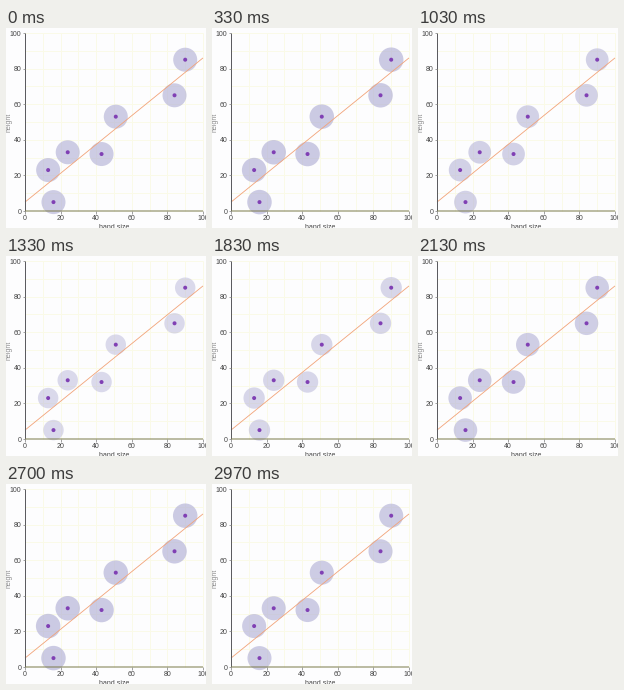
Recreate the animation shown at these times as a matplotlib script. Size 200 px wide and 200 px high, loop 3.01 s.

```python
import numpy as np
import matplotlib.pyplot as plt
from matplotlib.animation import FuncAnimation
from matplotlib.patches import Circle

SIZE, DPI = 200, 72
FRAMES, INTERVAL = 86, 35
LEFT, BASE, SCALE = 19, 183, 1.78
INK, SOFT = "#444444", "#8c8c8c"
GRID = "#fafae8"
POINTS = [(90, 85), (84, 65), (51, 53), (43, 32), (24, 33), (13, 23), (16, 5)]

plt.rcParams["font.family"] = "Liberation Sans"
plt.rcParams["font.size"] = 7


def px(x):
    return LEFT + SCALE * x


def py(y):
    return BASE - SCALE * y


fig = plt.figure(figsize=(SIZE / DPI, SIZE / DPI), dpi=DPI,
                 facecolor="#fdfdfe")
ax = fig.add_axes([0, 0, 1, 1])
ax.set_xlim(0, SIZE)
ax.set_ylim(SIZE, 0)
ax.axis("off")


def line(x0, y0, x1, y1, color, width, z, snap=None):
    ax.plot([x0, x1], [y0, y1], color=color, lw=width, zorder=z,
            solid_capstyle="butt", snap=snap)


def label(x, y, text, color=INK, **kw):
    ax.text(x, y, text, color=color, zorder=6, **kw)


# Faint grid
for v in range(10, 101, 10):
    line(px(v), py(0), px(v), py(100), GRID, 1, 0)
    line(px(0), py(v), px(100), py(v), GRID, 1, 0)

# Axes, ticks and labels
line(LEFT, py(100), LEFT, BASE, "#5c5c60", 1, 5)
line(LEFT, BASE, px(100), BASE, "#7c7c4c", 1, 5, snap=False)
for v in range(0, 101, 20):
    line(LEFT - 2.5, py(v), LEFT, py(v), SOFT, 0.8, 5)
    line(px(v), BASE, px(v), BASE + 2.5, SOFT, 0.8, 5)
    label(15.5, py(v), str(v), ha="right", va="center_baseline")
    label(px(v), 192, str(v), ha="center", va="baseline")
label(px(50), 201, "hand size", ha="center", va="baseline")
label(7, py(50), "height", SOFT, ha="right", va="center", rotation=90)

# Regression line
line(px(0), py(5), px(100), py(86), "#f2a47a", 0.85, 3)

halos = []
for x, y in POINTS:
    halo = Circle((px(x), py(y)), 12, fc="#b4b2d6", ec="none", zorder=2)
    halos.append(ax.add_patch(halo))
    ax.add_patch(Circle((px(x), py(y)), 2, fc="#8040b4", ec="none", zorder=4))


def update(i):
    swing = np.cos(2 * np.pi * i / FRAMES)
    radius = 12.2 + swing - 1.2 * swing ** 2
    for halo in halos:
        halo.set_radius(radius)
        halo.set_alpha(0.45 + 0.1 * (radius - 10))
    return halos


anim = FuncAnimation(fig, update, frames=FRAMES, interval=INTERVAL,
                     repeat=True, repeat_delay=0, blit=False)
plt.show()
```
